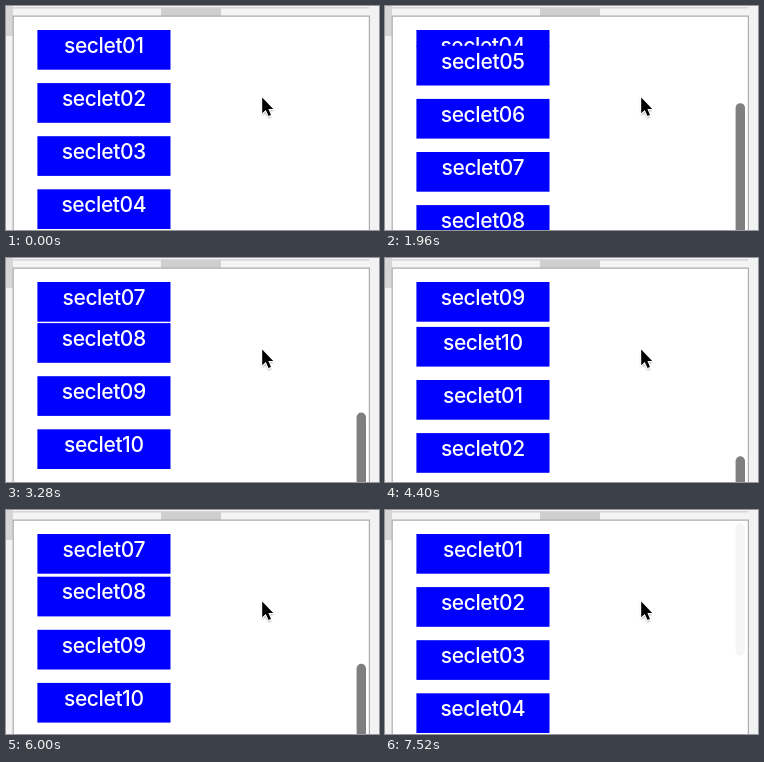
An HTML page that plays this animation: 373 by 224 pixels, repeating every 8 s.

```html
<!DOCTYPE html>
<html lang="en">
<head>
<meta charset="utf-8">
<title>Sticky list</title>
<style>
html, body { margin: 0; width: 100%; height: 100%; overflow: hidden; background: #fff; }
svg { display: block; width: 100vw; height: 100vh; }
text {
  font: 500 21px Inter, "Liberation Sans", Arial, sans-serif;
  letter-spacing: -.4px; fill: #fff; text-anchor: middle;
}
</style>
</head>
<body>
<svg viewBox="0 0 373 224">
  <defs>
    <filter id="soft" x="-50%" y="-50%" width="200%" height="200%">
      <feGaussianBlur stdDeviation="1.2"/>
    </filter>
    <path id="arrow" d="M256.2 91.4V107.2L259.8 103.9L262.5 110L265 108.9L262.4 102.9H267.2Z"/>
  </defs>
  <rect width="373" height="224" fill="#fff"/>
  <g id="list"></g>
  <rect id="thumb" x="350.6" width="9.4" height="133" rx="4.7" fill="#7f7f7f"/>

  <rect width="373" height="10" fill="#f4f4f4"/>
  <rect x="7" y="1.4" width="356" height="1" fill="#c4c4c4"/>
  <rect x="155" y="2" width="60" height="8" fill="#cfcfcf"/>
  <rect width="7" height="224" fill="#f2f2f2"/>
  <rect width="7" height="30" fill="#d6d6d6"/>
  <rect x="364" width="9" height="224" fill="#f2f2f2"/>
  <path d="M7.2 224V10.1H363.4V224" fill="none" stroke="#adadad" stroke-width="1.2"/>

  <use href="#arrow" y="2" fill="#000" opacity=".45" filter="url(#soft)"/>
  <use href="#arrow" fill="#000" stroke="#fff" stroke-width="2.2" stroke-linejoin="round" paint-order="stroke"/>
</svg>
<script>
const LOOP = 8000, STEP = 40;
const TOP = 24, PITCH = 53.1, HEIGHT = 39.7, COUNT = 14;
// time, scroll offset, speed
const keys = [
  [240, 0, 0], [1000, 101, 0.11], [1960, 196.6, 0.1], [3280, 330.6, 0.11], [4400, 433, 0],
  [5240, 433, 0], [6000, 329, -0.3], [6880, 0, -0.1]
];
const list = document.getElementById('list');
const thumb = document.getElementById('thumb');

function add(parent, tag, attrs) {
  const node = document.createElementNS('http://www.w3.org/2000/svg', tag);
  for (const name in attrs) node.setAttribute(name, attrs[name]);
  return parent.appendChild(node);
}

const items = Array.from({ length: COUNT }, (_, i) => {
  const g = add(list, 'g', {});
  const box = add(g, 'rect', { x: 31.4, width: 133.1, fill: '#00f' });
  add(g, 'text', { x: 97.8, y: 22.8 }).textContent = 'seclet' + String(i % 10 + 1).padStart(2, '0');
  return { g, box };
});

function scrollAt(t) {
  if (t <= keys[0][0]) return 0;
  const i = keys.findIndex(k => k[0] >= t);
  if (i < 0) return 0;
  const [t0, a, va] = keys[i - 1], [t1, b, vb] = keys[i];
  const d = t1 - t0, u = (t - t0) / d, w = 1 - u;
  return a * w * w * (1 + 2 * u) + b * u * u * (3 - 2 * u)
    + d * u * w * (va * w - vb * u);
}

function fade(t, from, to, rest) {
  return 1 - (1 - rest) * Math.min(1, Math.max(0, (t - from) / (to - from)));
}

function thumbOpacity(t) {
  if (t < 280) return 0;
  return t < 5280 ? fade(t, 4920, 5080, 0) : fade(t, 7320, 7520, 0.08);
}

function draw(t) {
  const s = scrollAt(t);
  const place = i => Math.max(TOP, TOP + PITCH * i - s);
  items.forEach(({ g, box }, i) => {
    const y = place(i), gap = place(i + 1) - y;
    // a box ends just under the next one, so soft edges do not add up
    g.setAttribute('visibility', gap > 0 ? 'visible' : 'hidden');
    g.setAttribute('transform', `translate(0 ${y.toFixed(2)})`);
    box.setAttribute('height', gap < HEIGHT ? Math.min(HEIGHT, gap + 1) : HEIGHT);
  });
  thumb.setAttribute('y', (13 + s * 0.428).toFixed(2));
  thumb.setAttribute('opacity', thumbOpacity(t));
}

function tick() {
  draw(Math.floor(performance.now() % LOOP / STEP) * STEP);
  requestAnimationFrame(tick);
}
tick();
</script>
</body>
</html>
```
